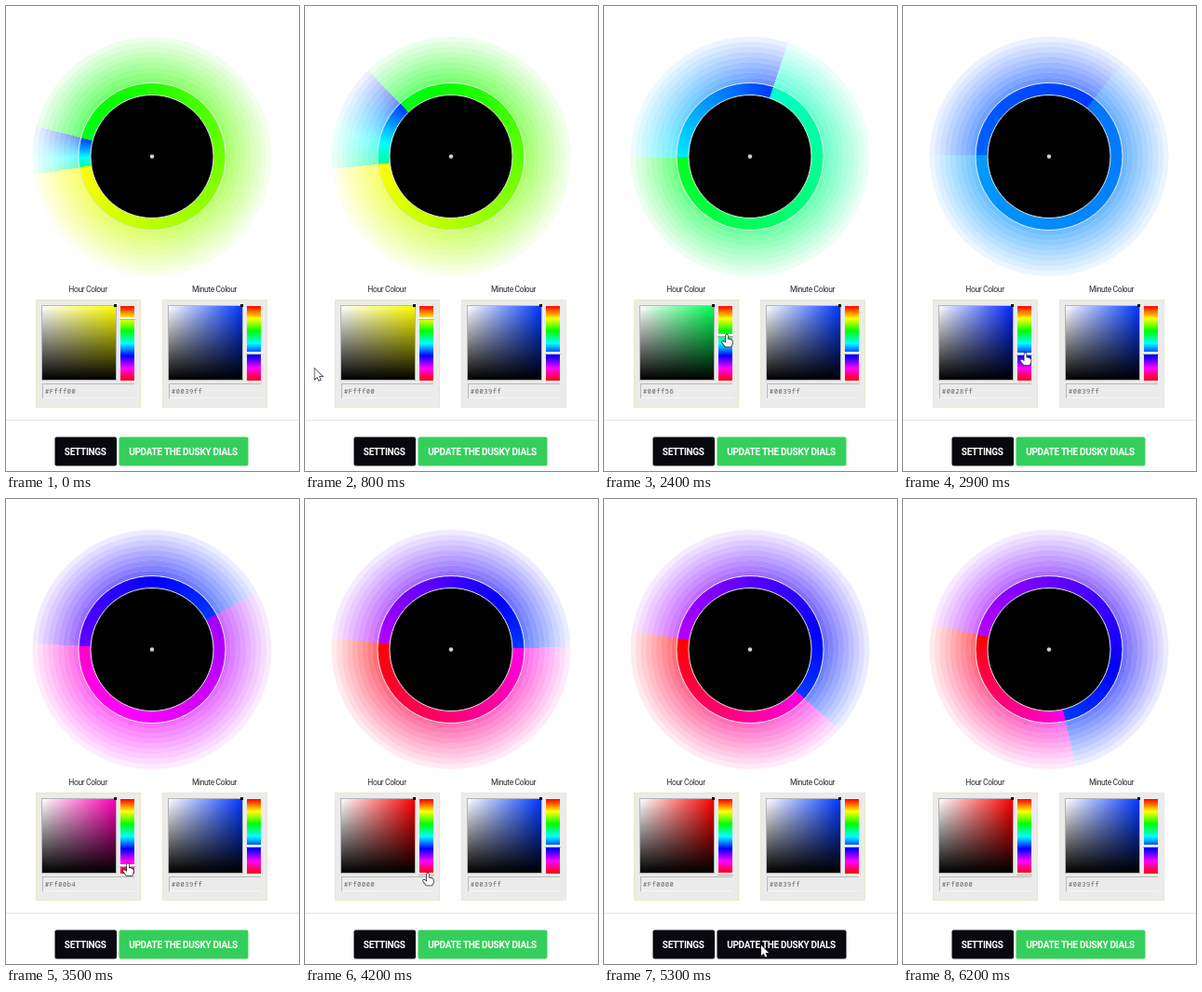
These frames come from a looping animation (315 px wide and 499 px high, 6300 ms). An HTML page with a canvas:

```html
<!DOCTYPE html>
<html lang="en">
<head>
<meta charset="utf-8">
<title>Dial colours</title>
<style>
  html, body { margin: 0; width: 100%; height: 100%; overflow: hidden; background: #fff; }
  canvas { display: block; width: 315px; height: 499px; }
</style>
</head>
<body>
<canvas id="stage" width="315" height="499"></canvas>
<script>
const ctx = document.getElementById('stage').getContext('2d');
const LOOP = 6300, STEP = 100;
const CX = 157, CY = 161.5;
const MINUTE_HUE = 226.59;
const DIAL_LAG = 150; // the dial follows the picker with a short delay
const SLIDER_TOP = 322, SLIDER_HEIGHT = 80;
const SETTINGS_BUTTON = { x: 52.5, y: 462.5, w: 66.5, h: 31 };
const UPDATE_BUTTON = { x: 121.5, y: 462.5, w: 139, h: 31 };

// Rows are [time, values...], interpolated linearly.
const HUE_KEYS = [[0, 60], [1400, 60], [1500, 63.53], [2400, 140.24], [3350, 312], [3500, 317.65], [4000, 360], [LOOP, 360]];
const CURSOR_KEYS = [
  [700, -14, 400], [1300, 133, 336], [1500, 133, 336], [2400, 132, 352.5], [3350, 131, 390], [3500, 131, 391],
  [4000, 132, 401.5], [4400, 132, 401.5], [5000, 169, 479], [5500, 169, 479], [5900, 186, 515]
];

const lerp = (a, b, k) => a + (b - a) * k;
const hsl = hue => `hsl(${hue % 360} 100% 50%)`;

function sample(keys, t) {
  if (t <= keys[0][0]) return keys[0].slice(1);
  const i = keys.findIndex(key => key[0] >= t);
  if (i < 0) return keys[keys.length - 1].slice(1);
  const a = keys[i - 1], b = keys[i];
  const k = (t - a[0]) / (b[0] - a[0]);
  return a.slice(1).map((v, n) => lerp(v, b[n + 1], k));
}

function hexLabel(hue) {
  const channel = n => {
    const k = (n + hue / 60) % 6;
    const v = 1 - Math.max(0, Math.min(k, 4 - k, 1));
    return Math.round(v * 255).toString(16).padStart(2, '0');
  };
  const hex = channel(5) + channel(3) + channel(1);
  return '#' + hex[0].toUpperCase() + hex.slice(1);
}

function rect(x, y, w, h, fill) {
  ctx.fillStyle = fill;
  ctx.fillRect(x, y, w, h);
}

function text(str, x, y, font, fill, spacing, align = 'center') {
  ctx.font = font;
  ctx.letterSpacing = spacing + 'px';
  ctx.textAlign = align;
  ctx.fillStyle = fill;
  ctx.fillText(str, x, y);
}

function disc(r, fill) {
  ctx.fillStyle = fill;
  ctx.beginPath();
  ctx.arc(CX, CY, r, 0, Math.PI * 2);
  ctx.fill();
}

function annulus(inner, outer) {
  ctx.beginPath();
  ctx.arc(CX, CY, outer, 0, Math.PI * 2);
  ctx.arc(CX, CY, inner, 0, Math.PI * 2, true);
  ctx.fill();
}

function circleLine(r) {
  ctx.strokeStyle = '#e4e8e0';
  ctx.lineWidth = 1;
  ctx.beginPath();
  ctx.arc(CX, CY, r, 0, Math.PI * 2);
  ctx.stroke();
}

// Each hand ends a sweep that starts part way between the two hues.
function dialGradient(hourAngle, minuteAngle, hourHue) {
  const split = ((minuteAngle - hourAngle) % 360 + 360) % 360 / 360;
  const g = ctx.createConicGradient((hourAngle - 90) * Math.PI / 180, CX, CY);
  const sweep = (from, to, hueA, hueB) => {
    for (let i = 0; i <= 24; i++) {
      g.addColorStop(lerp(from, to, i / 24), hsl(lerp(hueA, hueB, i / 24)));
    }
  };
  sweep(0, split, lerp(hourHue, MINUTE_HUE, 0.58), MINUTE_HUE);
  sweep(split, 1, lerp(hourHue, MINUTE_HUE, 0.4), hourHue);
  return g;
}

function drawDial(t) {
  const bands = 9, inner = 79, outer = 128.5;
  const [hourHue] = sample(HUE_KEYS, t - DIAL_LAG);
  ctx.fillStyle = dialGradient(261.4 + t * 0.00328, 284.6 + t * 0.0391, hourHue);
  for (let i = 0; i < bands; i++) {
    ctx.globalAlpha = lerp(0.56, 0.08, i / (bands - 1));
    annulus(lerp(inner, outer, i / bands), lerp(inner, outer, (i + 1) / bands));
  }
  ctx.globalAlpha = 1;
  annulus(65, inner);
  circleLine(inner);
  disc(66, '#000');
  circleLine(66);
  disc(2.2, '#d0d0d0');
}

function linear(x0, y0, x1, y1, colors) {
  const g = ctx.createLinearGradient(x0, y0, x1, y1);
  colors.forEach((c, i) => g.addColorStop(i / (colors.length - 1), c));
  return g;
}

function drawPicker(x, title, hue, border) {
  text(title, x + 56, 306.5, '8.5px Roboto, sans-serif', '#2c2c34', -0.38);
  rect(x, 315, 113, 116, border);
  rect(x + 1, 316, 111, 114, '#ebebeb');

  const sx = x + 7, sy = SLIDER_TOP;
  rect(sx - 1, sy - 1, 81, 81, '#b4b4b4');
  rect(sx, sy, 79, 79, linear(sx, 0, sx + 79, 0, ['#fff', hsl(hue)]));
  rect(sx, sy, 79, 79, linear(0, sy, 0, sy + 79, ['rgba(0,0,0,0)', '#000']));
  rect(x + 84, 320, 3, 3, '#000');

  const hues = Array.from({ length: 7 }, (_, i) => hsl(i * 60));
  rect(x + 91, sy, 15, SLIDER_HEIGHT, linear(0, sy, 0, sy + SLIDER_HEIGHT, hues));
  const markerY = Math.round(sy + hue / 360 * SLIDER_HEIGHT);
  rect(x + 90, markerY - 1, 17, 3, '#b0b0b0');
  rect(x + 90, markerY - 1, 17, 2, '#fff');

  rect(x + 7, 405, 99, 1, '#b9b9b9');
  rect(x + 7, 405, 1, 16, '#b9b9b9');
  rect(x + 8, 420, 98, 1, '#f6f6f6');
  text(hexLabel(hue), x + 10, 416, '7px "Noto Sans Mono", monospace', '#606068', 0.55, 'left');
}

function drawButton({ x, y, w, h }, label, fill) {
  ctx.fillStyle = fill;
  ctx.beginPath();
  ctx.roundRect(x, y, w, h, 2);
  ctx.fill();
  text(label, x + w / 2 - 0.5, 482, 'bold 10px Roboto, sans-serif', '#fff', -0.3);
}

const HAND = new Path2D('M-1 1Q0 -1 1 1V5L4 5.5L6 7V10L4.5 13H-1.5L-5 8.5Q-5 6.5 -3 7.5L-1 9Z');
const ARROW = new Path2D('M0 0V11L2.6 8.6L4.4 12.5L6.2 11.7L4.5 8H8Z');

function drawCursor(x, y, shape) {
  ctx.save();
  ctx.translate(x, y);
  ctx.strokeStyle = '#222';
  ctx.lineWidth = 1.4;
  ctx.stroke(shape);
  ctx.fillStyle = '#fff';
  ctx.fill(shape);
  ctx.restore();
}

const within = (x, y, b) => x >= b.x && x <= b.x + b.w && y >= b.y && y <= b.y + b.h;

function draw(t) {
  const [hourHue] = sample(HUE_KEYS, t);
  const [px, py] = sample(CURSOR_KEYS, t);
  rect(0, 0, 315, 499, '#fff');
  drawDial(t);
  drawPicker(32, 'Hour Colour', hourHue, '#e9e6c4');
  drawPicker(168, 'Minute Colour', MINUTE_HUE, '#e9e7d4');
  rect(0, 444, 315, 1, '#e4e4e8');
  drawButton(SETTINGS_BUTTON, 'SETTINGS', '#08080f');
  drawButton(UPDATE_BUTTON, 'UPDATE THE DUSKY DIALS', within(px, py, UPDATE_BUTTON) ? '#08080f' : '#34cf5b');
  const onSlider = within(px, py, { x: 122, y: 321, w: 18, h: 82 });
  drawCursor(px, py, onSlider ? HAND : ARROW);
}

function tick() {
  const t = performance.now() % LOOP;
  draw(Math.floor(t / STEP) * STEP);
  requestAnimationFrame(tick);
}
tick();
</script>
</body>
</html>
```
